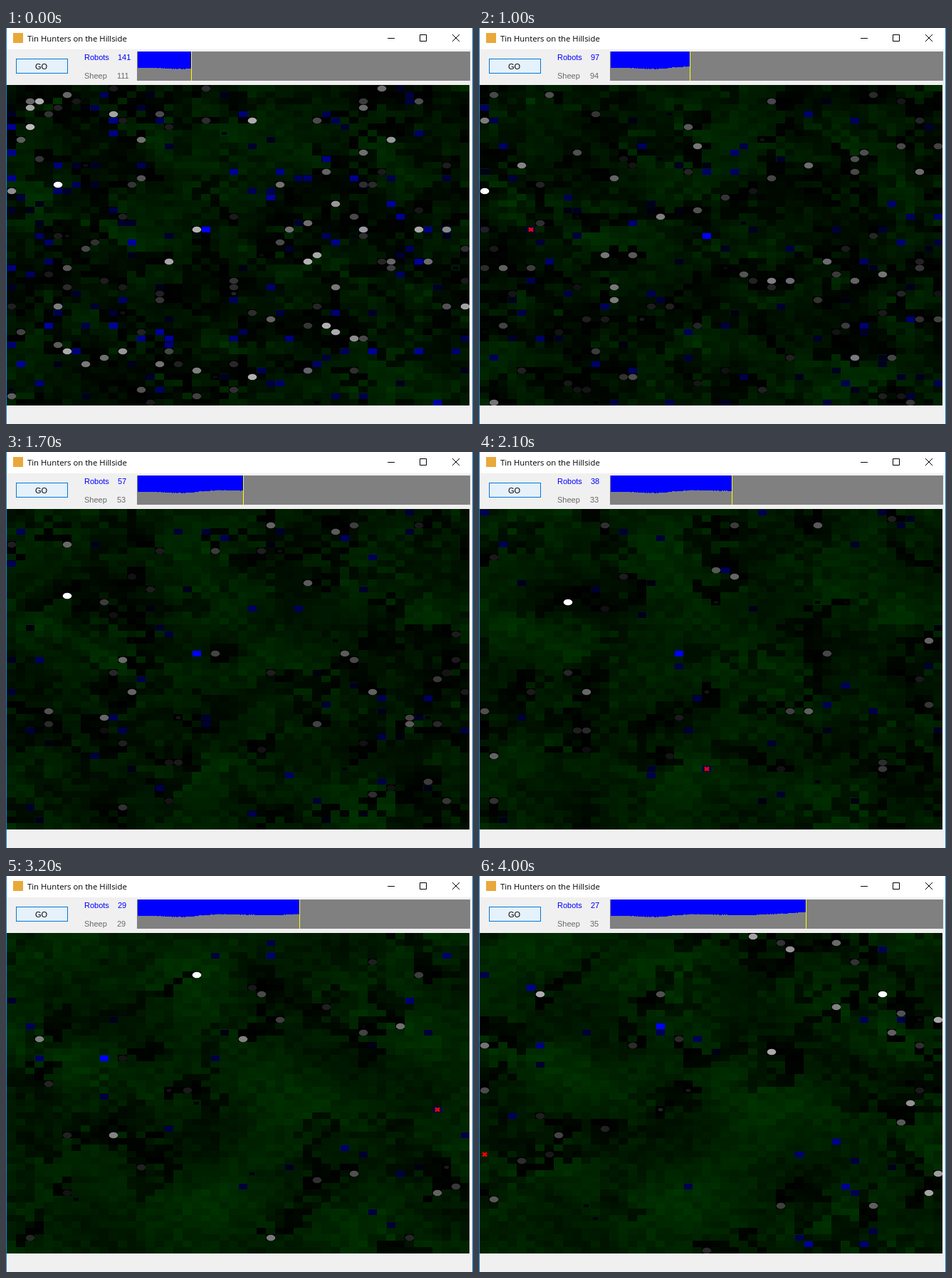
An HTML page with a canvas for the animation above (4100 ms loop, 656 by 556 pixels).

```html
<!DOCTYPE html>
<html lang="en">
<head>
<meta charset="utf-8">
<title>Tin Hunters on the Hillside</title>
<style>
  html, body { margin: 0; width: 100%; height: 100%; overflow: hidden; background: #f0f0f0; }
  svg, canvas { position: absolute; display: block; }
  svg { left: 0; top: 0; }
  canvas { left: 1px; top: 80px; }
  .ui { font: 11px "Liberation Sans", Arial, sans-serif; }
  .title { font: 11.3px "Open Sans", "Noto Sans", sans-serif; }
</style>
</head>
<body>
<svg width="656" height="556" viewBox="0 0 656 556">
  <rect width="656" height="556" fill="#f0f0f0"/>
  <rect width="656" height="30" fill="#fff"/>
  <path d="M0 0h1v556h-1zM655 0h1v556h-1z" fill="#1883d7"/>
  <rect x="10" y="7" width="14" height="14" fill="#e9a83a"/>
  <text class="title" x="30" y="19">Tin Hunters on the Hillside</text>
  <path d="M536 14.5h10M581.5 9.5h9v9h-9zM627 9l10 10M637 9l-10 10" fill="none" stroke="#000"/>
  <rect x="14.5" y="43.5" width="72" height="20" fill="#e5f1fb" stroke="#0078d7"/>
  <text class="ui" x="41" y="58">GO</text>
  <g class="ui" fill="#00f">
    <text x="110" y="45">Robots</text><text id="robotCount" x="157" y="45"></text>
  </g>
  <g class="ui" fill="#696969">
    <text x="110" y="71">Sheep</text><text id="sheepCount" x="156" y="71"></text>
  </g>
  <rect x="184" y="33" width="468" height="41" fill="#808080"/>
  <path id="share" fill="#00f" shape-rendering="crispEdges"/>
  <rect id="head" y="33" width="1" height="41" fill="#ff0"/>
</svg>
<canvas id="field" width="650" height="450"></canvas>
<script>
const N = 50, CW = 13, CH = 9, STEPS = 41, STEP_MS = 100, WARMUP = 120;
const CHART_X = 185, CHART_Y = 33, CHART_H = 41;
const $ = id => document.getElementById(id);
const ctx = $('field').getContext('2d');

let seed = 20417;
function rand() {
  seed = (seed + 0x6D2B79F5) | 0;
  let t = Math.imul(seed ^ (seed >>> 15), 1 | seed);
  t = (t + Math.imul(t ^ (t >>> 7), 61 | t)) ^ t;
  return ((t ^ (t >>> 14)) >>> 0) / 4294967296;
}
const anyCell = () => Math.floor(rand() * N);
const stray = v => (v + Math.floor(rand() * 3) - 1 + N) % N;

// Piecewise linear value at x
function lerpAt(xs, ys, x) {
  let i = 0;
  while (i < xs.length - 2 && x >= xs[i + 1]) i++;
  const u = Math.max(0, Math.min(1, (x - xs[i]) / (xs[i + 1] - xs[i])));
  return ys[i] + (ys[i + 1] - ys[i]) * u;
}

const keys = [0, 10, 14, 21, 26, 32, 40];
const heads = [260, 296, 317, 355, 380, 412, 459];
const robotsAt = s => lerpAt(keys, [141, 97, 71, 38, 29, 29, 27], s);
const sheepAt = s => lerpAt(keys, [111, 94, 68, 33, 25, 29, 35], s);
const headAt = s => Math.round(lerpAt(keys, heads, s));
// Animals are weaker in the middle of the loop
const vigourAt = s => 1 - .42 * Math.sin(Math.PI * s / STEPS);

// The strongest animal of each kind wanders between key points
function leader(cols, rows) {
  return {
    light: 255, size: 1,
    move(s) {
      const sway = 2 * Math.sin(Math.PI * s);
      this.c = Math.round(lerpAt(keys, cols, s) + sway);
      this.r = Math.round(lerpAt(keys, rows, s) - sway);
    }
  };
}

function wanderer(maxLight) {
  return {
    light: 22 + maxLight * Math.pow(rand(), 1.4),
    size: rand() < .08 ? .55 : 1,
    c: anyCell(), r: anyCell(),
    move() {
      const reborn = rand() < .008;
      this.c = reborn ? anyCell() : stray(this.c);
      this.r = reborn ? anyCell() : stray(this.r);
    }
  };
}

const flock = (first, size, maxLight) =>
  [first, ...Array.from({ length: size - 1 }, () => wanderer(maxLight))];
const sheep = flock(leader([5, 0, 3, 9, 7, 20, 43], [15, 16, 13, 14, 15, 6, 9]), 111, 165);
const robots = flock(leader([21, 24, 20, 21, 17, 10, 19], [22, 23, 22, 22, 23, 19, 14]), 141, 140);
const liveSheep = s => sheep.slice(0, Math.round(sheepAt(s)));
const liveRobots = s => robots.slice(0, Math.round(robotsAt(s)));

// Most grass a cell can hold: soft patches plus grain
const soil = Array.from({ length: N * N }, (_, i) => {
  const x = i % N, y = Math.floor(i / N);
  return 34 + 6 * Math.sin(x * .31 + 2 * Math.sin(y * .17)) + 5 * Math.cos(y * .36 - x * .11) + 14 * (rand() - .5);
});
const grass = soil.map(top => top * rand());

function generation(s) {
  grass.forEach((g, i) => { grass[i] = g + (soil[i] - g) * .06 * rand(); });
  for (const a of liveSheep(s)) {
    a.move(s);
    grass[a.r * N + a.c] = 0;
  }
  for (const a of liveRobots(s)) a.move(s);
}

function snapshot(s) {
  const copy = a => ({ c: a.c, r: a.r, size: a.size, light: Math.round(a.light * (a.light > 250 ? 1 : vigourAt(s))) });
  const shot = { grass: grass.map(Math.round), sheep: liveSheep(s).map(copy), robots: liveRobots(s).map(copy) };
  // Now and then a robot is lost, more often in a crowd
  shot.marks = shot.robots.slice(-3).filter(() => rand() < robotsAt(s) / 350);
  return shot;
}

for (let i = 0; i < WARMUP; i++) generation(0);
const frames = [snapshot(0)];
for (let s = 1; s < STEPS; s++) {
  const n = headAt(s) - headAt(s - 1);
  for (let k = 1; k <= n; k++) generation(s - 1 + k / n);
  frames.push(snapshot(s));
}

// Bottom edge of the robots' share in each chart column
const shares = Array.from({ length: headAt(STEPS) - CHART_X }, (_, i) => {
  const s = lerpAt(heads, keys, CHART_X + i);
  const part = robotsAt(s) / (robotsAt(s) + sheepAt(s));
  const dip = 1.6 * Math.exp(-(((i - 58) / 22) ** 2));
  return CHART_Y + Math.round(CHART_H * part + dip + (rand() - .5) * .9);
});

function drawField({ grass, sheep, robots, marks }) {
  grass.forEach((g, i) => {
    ctx.fillStyle = `rgb(0,${g},0)`;
    ctx.fillRect((i % N) * CW, Math.floor(i / N) * CH, CW, CH);
  });
  for (const { c, r, size, light } of robots) {
    const w = Math.round(12 * size), h = Math.round(8 * size);
    ctx.fillStyle = `rgb(0,0,${size < 1 ? light >> 2 : light})`;
    ctx.fillRect(c * CW + 1 + ((12 - w) >> 1), r * CH + 1 + ((8 - h) >> 1), w, h);
  }
  for (const { c, r, size, light } of sheep) {
    const v = size < 1 ? light >> 2 : light;
    ctx.fillStyle = `rgb(${v},${v},${v})`;
    ctx.beginPath();
    ctx.ellipse(c * CW + 7, r * CH + 5, 6.3 * size, 4.3 * size, 0, 0, 2 * Math.PI);
    ctx.fill();
  }
  ctx.strokeStyle = '#f00';
  ctx.lineWidth = 2.8;
  for (const { c, r } of marks) {
    const x = c * CW + 7, y = r * CH + 5;
    ctx.beginPath();
    ctx.moveTo(x - 3, y - 2.5); ctx.lineTo(x + 3, y + 2.5);
    ctx.moveTo(x + 3, y - 2.5); ctx.lineTo(x - 3, y + 2.5);
    ctx.stroke();
  }
}

function drawPanel(s) {
  const x = headAt(s);
  const edge = shares.slice(0, x - CHART_X).map(y => `V${y}h1`).join('');
  $('robotCount').textContent = Math.round(robotsAt(s));
  $('sheepCount').textContent = Math.round(sheepAt(s));
  $('share').setAttribute('d', `M${CHART_X} ${CHART_Y}${edge}V${CHART_Y}z`);
  $('head').setAttribute('x', x);
}

let shown = -1;
function tick() {
  const s = Math.floor(performance.now() / STEP_MS) % STEPS;
  if (s !== shown) {
    shown = s;
    drawPanel(s);
    drawField(frames[s]);
  }
  requestAnimationFrame(tick);
}
tick();
</script>
</body>
</html>
```
